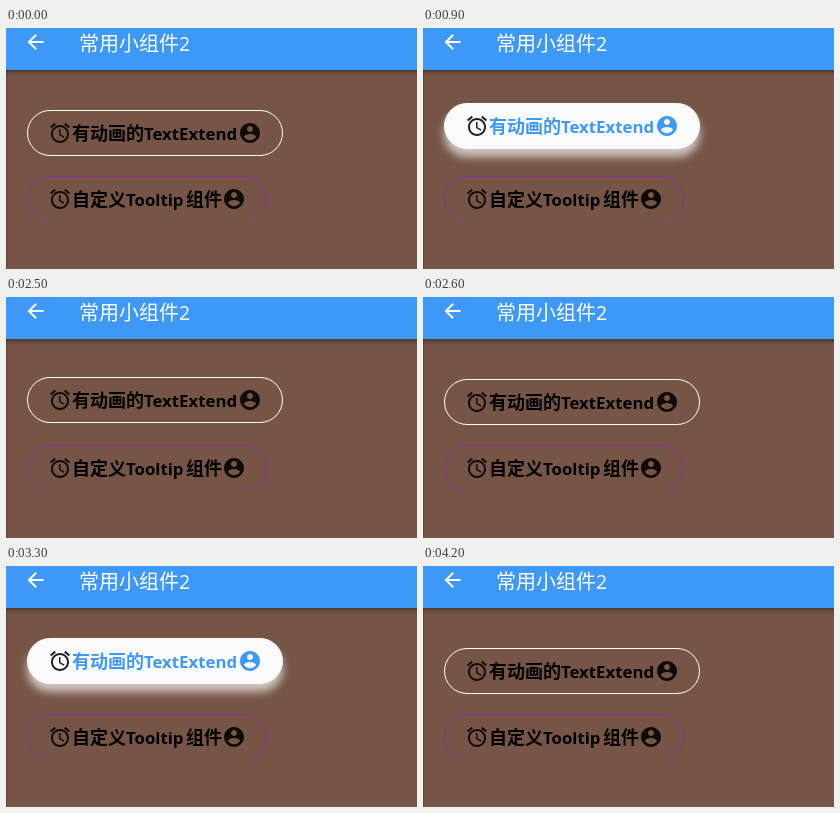
Recreate the animation shown at these times as an HTML page. Size 411 by 241 pixels, loop 5500 ms.

```html
<!DOCTYPE html>
<html lang="zh-CN">
<head>
<meta charset="utf-8">
<style>
  html, body { margin: 0; width: 100%; height: 100%; overflow: hidden; background: #765546; }
  svg { display: block; }
  text { font: bold 18px "Noto Sans CJK SC", "Noto Sans CJK", sans-serif; }
  .latin { font: bold 16.8px "Open Sans", "Noto Sans", sans-serif; }
  .title { font-size: 20px; font-weight: 400; fill: #fff; }
  .title.latin { font-size: 19.5px; }
  .icon { fill: #000; fill-opacity: .87; }
  .bar { filter: drop-shadow(0 2px 2px rgba(0, 0, 0, .4)); }
  .glow { fill: #fff; fill-opacity: .66; filter: blur(4px); }
  .face { fill: none; stroke: #fff; }
  .raised { display: none; }
  .hover .raised { display: inline; }
  .hover .face { fill: #fafafa; stroke: #fafafa; }
  .hover .accent { fill: #3d98f7; fill-opacity: 1; }
</style>
</head>
<body>
<svg width="411" height="241" viewBox="0 0 411 241">
  <defs>
    <path id="alarm" d="M22 5.72l-4.6-3.86-1.29 1.53 4.6 3.86L22 5.72zM7.88 3.39L6.6 1.86 2 5.71l1.29 1.53 4.59-3.85zM12.5 8H11v6l4.75 2.85.75-1.23-4-2.37V8zM12 4c-4.97 0-9 4.03-9 9s4.02 9 9 9c4.97 0 9-4.03 9-9s-4.03-9-9-9zm0 16c-3.87 0-7-3.13-7-7s3.13-7 7-7 7 3.13 7 7-3.13 7-7 7z"/>
    <path id="person" d="M12 2C6.48 2 2 6.48 2 12s4.48 10 10 10 10-4.48 10-10S17.52 2 12 2zm0 3c1.66 0 3 1.34 3 3s-1.34 3-3 3-3-1.34-3-3 1.34-3 3-3zm0 14.2c-2.5 0-4.71-1.28-6-3.22.03-1.99 4-3.08 6-3.08 1.99 0 5.97 1.09 6 3.08-1.29 1.94-3.5 3.22-6 3.22z"/>
    <clipPath id="open"><rect width="300" height="45"/></clipPath>
  </defs>

  <rect y="42" width="1" height="199" fill="#5d483f"/>
  <rect class="bar" x="-10" y="-10" width="431" height="52" fill="#3d98f7"/>
  <path transform="translate(17.5 2)" fill="#fff" d="M20 11H7.83l5.59-5.59L12 4l-8 8 8 8 1.41-1.41L7.83 13H20v-2z"/>
  <text class="title" x="73" y="23">常用小组件</text>
  <text class="title latin" x="173" y="23">2</text>

  <g id="button">
    <rect class="glow raised" x="21" y="8" width="256" height="46" rx="23"/>
    <rect class="face" x="21.5" y=".5" width="255" height="45" rx="22.5"/>
    <use class="icon" href="#alarm" x="42" y="11"/>
    <text class="accent" x="66" y="30">有动画的</text>
    <text class="accent latin" x="138" y="30">TextExtend</text>
    <use class="icon accent" href="#person" x="232" y="11"/>
  </g>

  <g transform="translate(0 148)">
    <rect x="21.5" y=".5" width="239" height="45" rx="22.5" fill="none" stroke="#8f2fa0" clip-path="url(#open)"/>
    <use class="icon" href="#alarm" x="42" y="11"/>
    <text x="66" y="30">自定义</text>
    <text class="latin" x="120" y="30">Tooltip</text>
    <text x="180" y="30">组件</text>
    <use class="icon" href="#person" x="216" y="11"/>
  </g>
</svg>
<script>
  const LOOP = 5500;
  // start time, top of the button, hovered
  const poses = [
    [0, 82, false], [800, 82, true], [900, 75, true], [1000, 72, true],
    [2500, 80, false], [2600, 82, false], [3200, 75, true], [3300, 72, true],
    [4100, 80, false], [4200, 82, false]
  ];
  const button = document.getElementById("button");
  const start = performance.now();

  function draw(now) {
    const t = Math.max(0, now - start) % LOOP;
    const [, top, hovered] = poses.findLast(([from]) => from <= t);
    button.setAttribute("transform", `translate(0 ${top})`);
    button.classList.toggle("hover", hovered);
    requestAnimationFrame(draw);
  }
  draw(start);
</script>
</body>
</html>
```
